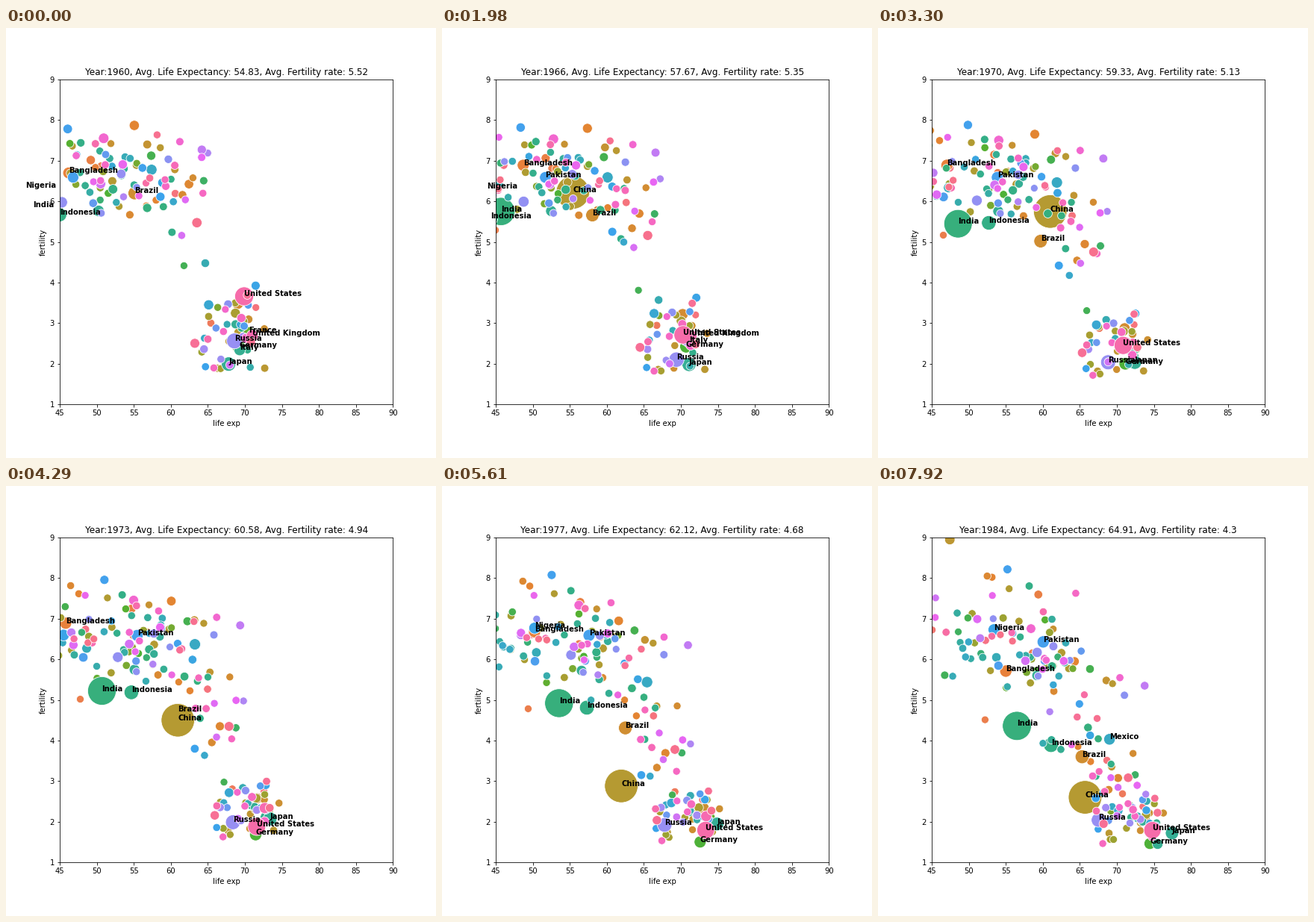
A matplotlib script for the animation above (8 s loop, 576x576 px).

```python
import numpy as np
import matplotlib.pyplot as plt
from matplotlib.animation import FuncAnimation
from matplotlib.colors import LinearSegmentedColormap

T = np.arange(25)               # years since 1960
YEAR_MS, STEP_MS, LOOP_MS = 330, 40, 8000
ALWAYS = range(25)

# Hue wheel of even lightness; the hue follows the alphabet.
WHEEL = LinearSegmentedColormap.from_list("wheel", [
    "#f77189", "#e68332", "#bb9832", "#97a431", "#50b131", "#34af84", "#36ada4",
    "#38aabf", "#3ba3ec", "#a48cf4", "#e866f4", "#f668c2", "#f77189"], N=512)

rng = np.random.default_rng(5)
dots, labels = [], []


def add(hue, life, birth, pop):
    dots.append((hue, np.stack([life, birth], -1), pop))


def country(name, hue, pop, *stops, shown=ALWAYS):
    """Move along stops of (year, life, births); pop is in millions, first and last."""
    year, life, birth = zip(*stops)
    labels.append((name, len(dots), set(shown)))
    add(hue, np.interp(T, year, life), np.interp(T, year, birth),
        np.interp(T, [0, 24], pop))


def crowd(count, start, gain, high, low, turn, pace):
    """Small countries: life rises steadily, births slide from high to low around turn."""
    for _ in range(count):
        life = start()
        mid = turn(life)
        slide = 1 / (1 + np.exp((T - mid) / pace))
        top = high(life)
        bottom = low(top)
        add(rng.uniform(), life + rng.uniform(*gain) * T / 24,
            bottom + (top - bottom) * slide,
            np.full(25, min(rng.lognormal(1.6, 1.1), 50)))


country("China", .18, (667, 1037), (0, 31.6, 4), (6, 55.4, 6.22), (10, 61, 5.75),
        (13, 60.95, 4.5), (17, 61.95, 2.88), (24, 65.7, 2.6))
country("India", .41, (445, 767), (0, 41.4, 5.86), (6, 45.7, 5.75),
        (17, 53.55, 4.92), (24, 56.5, 4.36))
country("Indonesia", .42, (88, 162), (0, 45, 5.67), (6, 44.3, 5.58),
        (10, 52.7, 5.47), (17, 57.3, 4.81), (24, 61.1, 3.89))
country("Bangladesh", .075, (50, 90), (0, 46.2, 6.7), (6, 48.7, 6.89),
        (13, 45.8, 6.89), (17, 50.25, 6.68), (24, 55, 5.71))
country("Nigeria", .66, (45, 81), (0, 40.4, 6.34), (6, 43.8, 6.32), (7, 38.4, 6.34),
        (17, 50.25, 6.77), (24, 53.4, 6.73), shown=[*range(8), *range(16, 25)])
country("Pakistan", .675, (45, 90), (0, 46.8, 6.59), (6, 51.7, 6.59),
        (17, 57.6, 6.59), (24, 60.05, 6.43), shown=range(3, 25))
country("Brazil", .125, (72, 132), (0, 55.1, 6.2), (6, 58.05, 5.66),
        (10, 59.7, 5.02), (24, 65.3, 3.6))
country("United States", .95, (187, 237), (0, 69.9, 3.66), (6, 70.3, 2.71),
        (10, 70.85, 2.45), (13, 71.6, 1.88), (17, 73.35, 1.79), (24, 74.8, 1.79))
country("United Kingdom", .94, (52, 56), (0, 71, 2.69), (6, 71.4, 2.69),
        (24, 74.7, 1.78), shown=range(9))
country("France", .31, (46, 55), (0, 70.5, 2.77), (24, 75.3, 1.83), shown=range(2))
country("Germany", .34, (73, 78), (0, 69.2, 2.4), (6, 70.7, 2.42),
        (13, 71.45, 1.68), (17, 72.6, 1.5), (24, 74.45, 1.46))
country("Russia", .74, (120, 143), (0, 68.6, 2.56), (6, 69.4, 2.1),
        (17, 67.8, 1.92), (24, 67.5, 2.04))
country("Japan", .46, (93, 120), (0, 67.8, 1.99), (6, 71.1, 1.98),
        (13, 73.4, 2.07), (24, 77.45, 1.72))
country("Italy", .45, (49, 57), (0, 69.3, 2.34), (6, 71.1, 2.53),
        (24, 75.5, 1.45), shown=range(8))
country("Mexico", .59, (38, 75), (0, 57.4, 6.78), (13, 63.25, 6.37),
        (21, 67.6, 4.51), (24, 69, 4.03), shown=range(19, 25))

# Young countries with large families throughout
crowd(66, lambda: rng.uniform(35, 53), (8, 14), lambda life: rng.normal(6.7, .55),
      lambda top: top + rng.normal(-.15, .7), lambda life: 15, 4)
# Long lives, yet births fall late
crowd(7, lambda: rng.uniform(55, 66), (8, 12), lambda life: rng.uniform(6.8, 8),
      lambda top: top - 2.5, lambda life: 19, 4)
# Births fall sooner where lives are longer
crowd(56, lambda: rng.uniform(50, 65), (7, 10), lambda life: rng.normal(6.5, .6),
      lambda top: rng.uniform(2, 3), lambda life: 36 - 1.9 * (life - 50) + rng.normal(0, 5),
      5)
# Small families from the start
crowd(44, lambda: 73 - 10 * rng.beta(1.5, 2.2), (2, 5.5),
      lambda life: max(rng.normal(2.9, .6), 1.9),
      lambda top: 1.45 + .2 * top + rng.normal(0, .25), lambda life: 11, 4)

hues, paths, people = (np.array(part) for part in zip(*dots))
order = np.argsort(hues)
rank = np.argsort(order)
spots = paths[order].transpose(1, 0, 2)
areas = 100 + 1900 * (people / people[0])[order].T

stops = [0, 6, 10, 13, 17, 21, 24]
mean_life = np.interp(T, stops, [54.83, 57.67, 59.33, 60.58, 62.12, 63.75, 64.91])
mean_birth = np.interp(T, stops, [5.52, 5.35, 5.13, 4.94, 4.68, 4.46, 4.3])

fig, ax = plt.subplots(figsize=(8, 8), dpi=72)
fig.subplots_adjust(left=.125, right=.9, bottom=.125, top=.88)
ax.set(xlim=(45, 90), ylim=(1, 9), xlabel="life exp", ylabel="fertility")
title = ax.set_title("")
bubbles = ax.scatter(*spots[0].T, s=areas[0], c=WHEEL(hues[order]),
                     edgecolors="white", linewidths=.8)
tags = [(ax.text(0, 0, name, weight="bold"), rank[i], shown) for name, i, shown in labels]


def draw(frame):
    y = min((frame * STEP_MS + STEP_MS - 10) // YEAR_MS, 24)
    bubbles.set_offsets(spots[y])
    bubbles.set_sizes(areas[y])
    for tag, i, shown in tags:
        tag.set_position(spots[y, i])
        tag.set_visible(y in shown)
    title.set_text(f"Year:{1960 + y}, Avg. Life Expectancy: {round(mean_life[y], 2)}, "
                   f"Avg. Fertility rate: {round(mean_birth[y], 2)}")
    return []


anim = FuncAnimation(fig, draw, frames=LOOP_MS // STEP_MS, interval=STEP_MS,
                     init_func=lambda: draw(0), repeat=True, repeat_delay=0)
plt.show()
```
